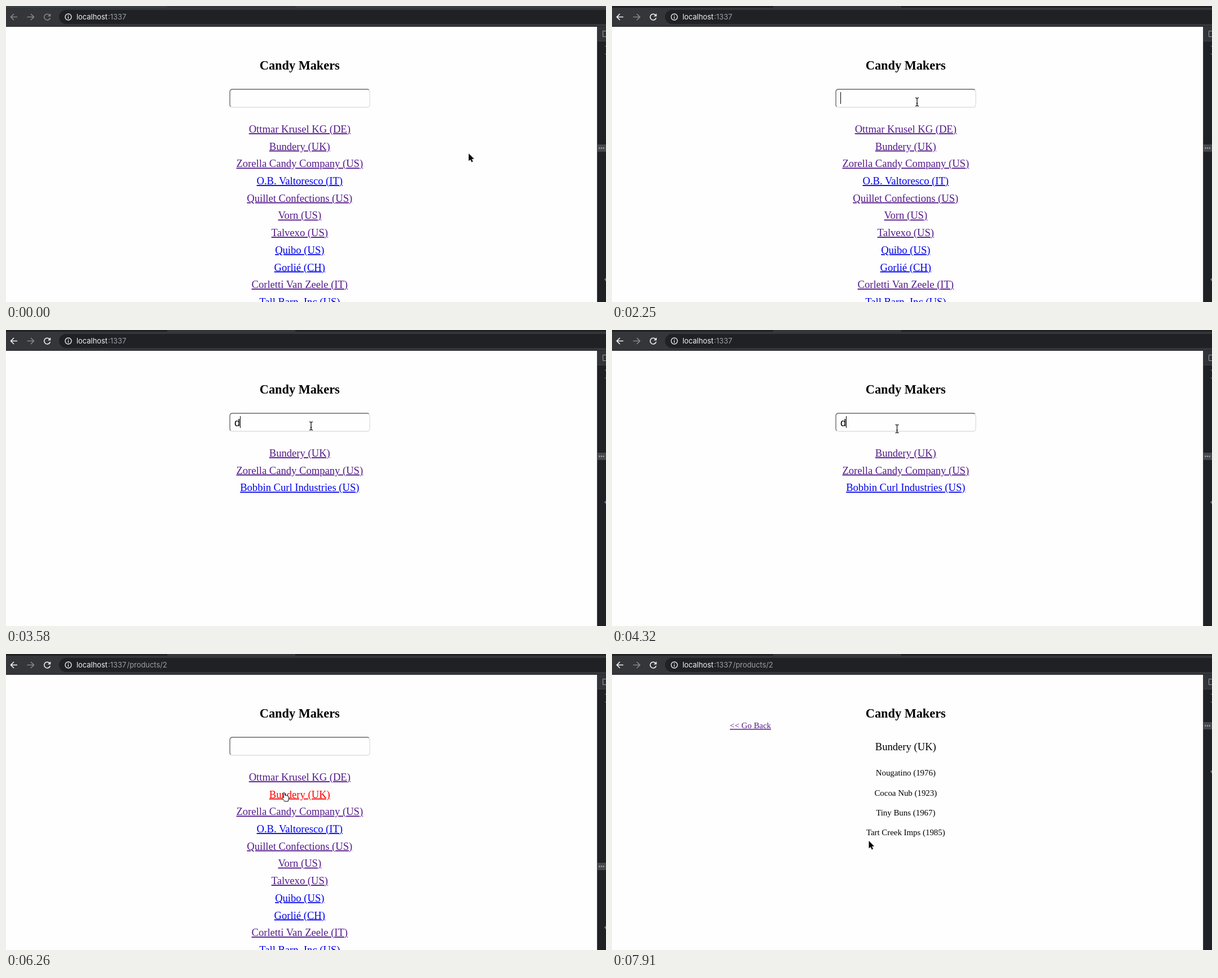
Write an HTML page that moves like this. It is 1064 by 526 pixels and loops after 8000 ms.

```html
<!DOCTYPE html>
<html lang="en">
<head>
<meta charset="utf-8">
<title>Candy Makers</title>
<style>
  html, body { margin: 0; width: 100%; height: 100%; overflow: hidden; background: #fefefe; }
  svg { display: block; width: 1064px; height: 526px; }
  text { font-family: "Liberation Serif", Times, serif; font-size: 18.6px; white-space: pre; }
  .mid { text-anchor: middle; }
  .small { font-size: 14.88px; }
  .link { text-decoration: underline; fill: #0000ee; }
  .visited { fill: #551a8b; }
  .url { font: 12.9px Inter, sans-serif; fill: #9aa0a6; }
  .field { font-family: "Liberation Sans", Arial, sans-serif; }
  .line { fill: none; stroke-width: 1.6; }
</style>
</head>
<body>
<svg id="stage" viewBox="0 0 1064 526">
  <rect width="1064" height="526" fill="#fefefe"/>

  <!-- browser bar -->
  <rect width="1064" height="37" fill="#35363a"/>
  <rect id="tabsLeft" width="286" height="3" fill="#202124"/>
  <rect id="tabsRight" x="513" width="551" height="3" fill="#202124"/>
  <rect y="36" width="1064" height="1" fill="#28292c"/>
  <rect x="94" y="7" width="1000" height="25" rx="12.5" fill="#202124"/>
  <path id="back" class="line" d="M20 19.5H9M14 14L8.5 19.5L14 25"/>
  <path class="line" stroke="#85868a" d="M37.5 19.5H49M44 14L49.500 19.5L44 25"/>
  <path id="reload" class="line" d="M77.300 16.200A5.400 5.400 0 1 0 78.300 21"/>
  <path id="reloadTip" d="M79.200 13.300V18.500H74Z"/>
  <g stroke="#e8eaed" fill="none" stroke-width="1.4">
    <circle cx="110.500" cy="19.500" r="5.500"/>
    <path d="M110.500 18.800V22.700M110.500 16.300V17.700"/>
  </g>
  <text class="url" x="125" y="24" style="fill:#f1f3f4">localhost</text>
  <text class="url" x="181" y="24">:1337</text>
  <text id="route" class="url" x="214.500" y="24">/products/2</text>

  <!-- side panel -->
  <rect x="1048" y="37" width="16" height="489" fill="#202124"/>
  <rect x="1048" y="37" width="16" height="25" fill="#333437"/>
  <path d="M1048.500 37V526M1048 62.500H1064" stroke="#3f4044"/>
  <path d="M1064 44.500H1058.500V54.500H1064" fill="none" stroke="#9aa0a6"/>
  <path d="M1062 71.500H1064M1062 85.500H1064" stroke="#3f9fc8"/>
  <g id="splitter">
    <rect x="1049" y="-6" width="15" height="13" fill="#47484b"/>
    <g fill="#a4a7ab">
      <circle cx="1052.300" cy="0.500" r="1.200"/>
      <circle cx="1056" cy="0.500" r="1.200"/>
      <circle cx="1059.700" cy="0.500" r="1.200"/>
    </g>
  </g>
  <path id="prompt" d="M1064.500 -2.500L1062 0L1064.500 2.500" fill="none" stroke="#3fa0e8" stroke-width="1.400"/>

  <!-- page -->
  <text class="mid" x="520.800" y="113" style="font-size:22.32px;font-weight:bold">Candy Makers</text>
  <g id="search" fill="none">
    <path d="M643.600 149.200Q645 150.500 645 153V175Q645 180 640 180H402Q399.600 180 398.400 179" stroke="#dedede" stroke-width="1.300"/>
    <path d="M398.400 179Q397 177.500 397 175V153Q397 148 402 148H640Q642.500 148 643.600 149.200" stroke="#8c8c8c" stroke-width="1.800"/>
  </g>
  <text id="typed" class="field" x="405" y="171">d</text>
  <rect id="caret" y="153" width="1" height="21"/>
  <g id="all"></g>
  <g id="found"></g>
  <g id="detail"></g>

  <!-- pointers, tip at 0,0 -->
  <g id="pointer" stroke-linejoin="round">
    <path id="arrow" d="M0 0V13.500L3.100 10.700L5.200 15.400L7.500 14.400L5.400 9.800H9.600Z" stroke="#fff" stroke-width="2" paint-order="stroke"/>
    <g id="beam" fill="none">
      <path d="M0 -6V6" stroke="#fff" stroke-width="2.600"/>
      <path d="M-3 -7.300Q0 -7.300 0 -5.300Q0 -7.300 3 -7.300M0 -5.500V5.500M-3 7.300Q0 7.300 0 5.300Q0 7.300 3 7.300M-1.500 2.500H1.500" stroke="#000" stroke-width="1.200"/>
    </g>
    <path id="hand" fill="#fff" stroke="#000" d="M-1.300 .3C-1.300 -1.200 1 -1.200 1.200 .3L2 4.500C2.800 3.600 4.300 4 4.400 5C5.200 4.300 6.600 4.700 6.700 5.800C7.500 5.300 8.500 5.900 8.500 7V10C8.500 12 7.300 13 7.300 14.800H.5C.2 13 -1.500 11.500 -3 9.300C-4.200 7.600 -2.600 6.600 -1.400 7.800L-.3 8.600Z"/>
  </g>
</svg>
<script>
const LOOP = 8000;
const MID = 520.8;
const $ = id => document.getElementById(id);

// A leading * marks a visited link.
const makers = [
  '*Ottmar Krusel KG (DE)', '*Bundery (UK)', '*Zorella Candy Company (US)',
  'O.B. Valtoresco (IT)', '*Quillet Confections (US)', '*Vorn (US)',
  '*Talvexo (US)', 'Quibo (US)', 'Gorlié (CH)', '*Corletti Van Zeele (IT)',
  'Tall Barn, Inc (US)', 'Bobbin Curl Industries (US)'
];
const sweets = ['Nougatino (1976)', 'Cocoa Nub (1923)', 'Tiny Buns (1967)', 'Tart Creek Imps (1985)'];

function addText(parent, words, x, y, cls) {
  const el = document.createElementNS('http://www.w3.org/2000/svg', 'text');
  el.setAttribute('x', x);
  el.setAttribute('y', y);
  el.setAttribute('class', cls);
  el.textContent = words;
  return parent.appendChild(el);
}

function addLinks(parent, names) {
  return names.map((name, i) => addText(parent, name.replace('*', ''), MID, 225 + i * 30.69,
    'mid link' + (name[0] === '*' ? ' visited' : '')));
}

// Hold each value from its time until the next one.
function hold(el, prop, rows) {
  const frames = rows.map(([t, value]) => ({ offset: t / LOOP, [prop]: value, easing: 'step-end' }));
  frames.push({ offset: 1, [prop]: rows[rows.length - 1][1] });
  el.animate(frames, { duration: LOOP, iterations: Infinity });
}

const show = (el, rows) =>
  hold(el, 'visibility', rows.map(([t, on]) => [t, on ? 'visible' : 'hidden']));
const place = (el, rows) =>
  hold(el, 'transform', rows.map(([t, x, y]) => [t, `translate(${x}px, ${y}px)`]));

const links = addLinks($('all'), makers);
addLinks($('found'), makers.filter(name => name.includes('d')));
addText($('detail'), '<< Go Back', 209, 132, 'small link visited');
addText($('detail'), 'Bundery (UK)', MID, 171, 'mid');
sweets.forEach((name, i) => addText($('detail'), name, MID, 216.3 + i * 35.3, 'mid small'));

// Window gains focus
const focus = (el, prop, idle, live) => hold(el, prop, [[0, idle], [450, live]]);
focus($('back'), 'stroke', '#85868a', '#f1f3f4');
focus($('reload'), 'stroke', '#85868a', '#f1f3f4');
focus($('reloadTip'), 'fill', '#85868a', '#f1f3f4');
focus($('tabsLeft'), 'fill', '#3c4043', '#202124');
focus($('tabsRight'), 'fill', '#3c4043', '#202124');

// Page states
show($('all'), [[0, 1], [2400, 0], [4770, 1], [6410, 0]]);
show($('found'), [[0, 0], [2400, 1], [4770, 0]]);
show($('typed'), [[0, 0], [2400, 1], [4770, 0]]);
show($('search'), [[0, 1], [6410, 0]]);
show($('detail'), [[0, 0], [6410, 1]]);
show($('route'), [[0, 0], [6260, 1]]);
hold(links[1], 'fill', [[0, '#551a8b'], [6260, '#ff0000']]);

show($('caret'), [[0, 0], [1200, 1], [1800, 0], [2250, 1], [2990, 0], [3440, 1],
  [3880, 0], [4320, 1], [5220, 0], [5660, 1], [5960, 0]]);
place($('caret'), [[0, 405, 0], [2400, 415, 0], [4770, 405, 0]]);

// Side panel: time, splitter y, prompt y
const panel = [[0, 252, 486], [2550, 224, 306], [4920, 377, 486], [6410, 127, 209]];
place($('splitter'), panel.map(([t, y]) => [t, 0, y]));
place($('prompt'), panel.map(([t, , y]) => [t, 0, y]));

// Pointer: time, x, y, shape
const moves = [
  [0, 820.5, 262, 'arrow'], [750, 690, 230, 'arrow'], [900, 554, 195.5, 'arrow'],
  [1050, 541, 170.5, 'beam'], [3590, 537, 177, 'beam'], [3740, 529, 196, 'arrow'],
  [3880, 522, 217, 'hand'], [4030, 516, 204, 'arrow'], [4170, 509, 188, 'arrow'],
  [4320, 505.5, 175.5, 'beam'], [5220, 507.5, 185.5, 'arrow'], [5360, 511, 200, 'arrow'],
  [5510, 500, 233, 'hand'], [5660, 493, 247, 'hand'], [6410, 493, 247, 'beam'],
  [7910, 455.5, 332, 'arrow']
];
place($('pointer'), moves);
for (const shape of ['arrow', 'beam', 'hand'])
  show($(shape), moves.map(([t, , , s]) => [t, s === shape]));
</script>
</body>
</html>
```
